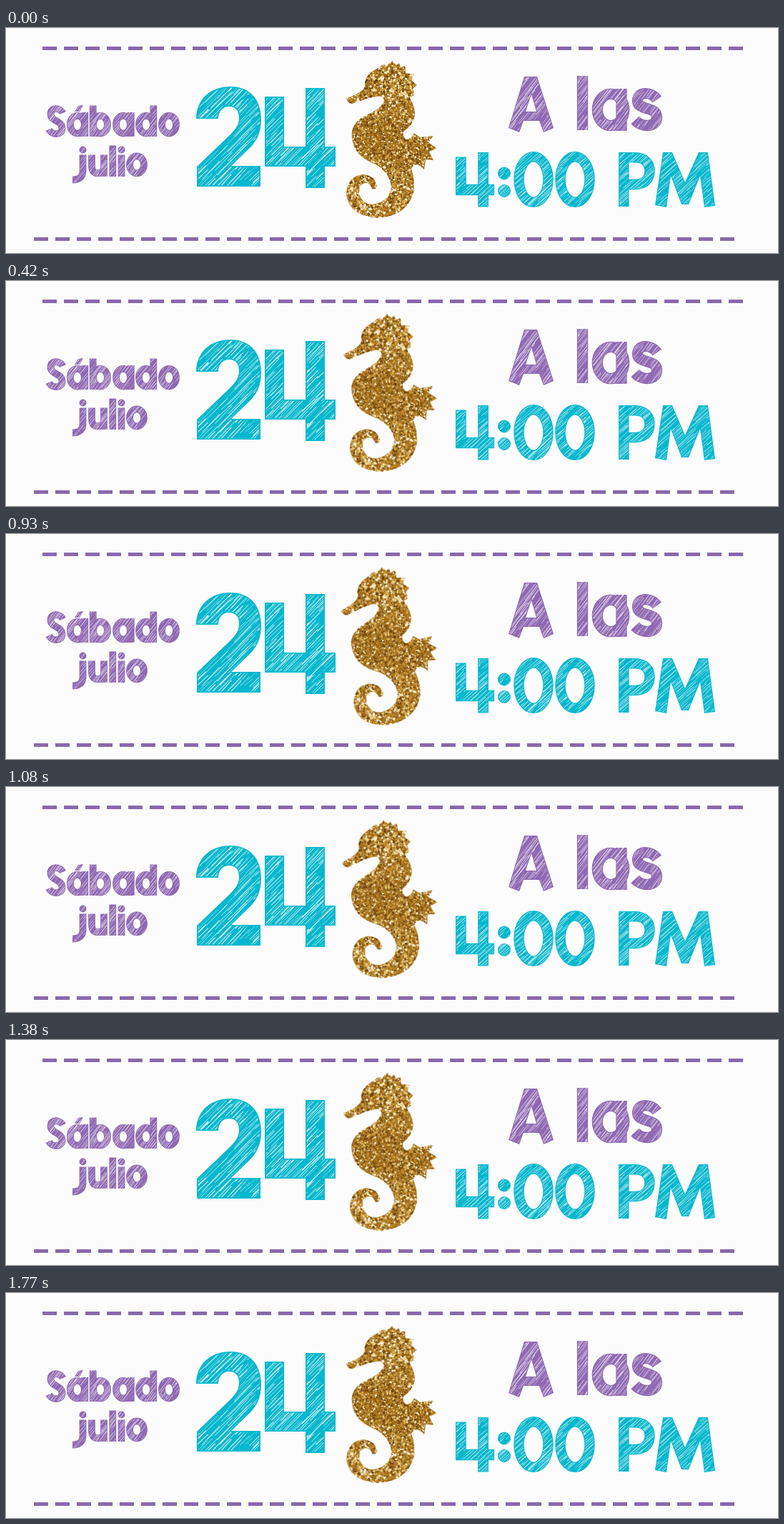
These frames come from a looping animation (1080x315 px, 1.8 s). An HTML page with a canvas:

```html
<!DOCTYPE html>
<html lang="es">
<head>
<meta charset="utf-8">
<title>Sábado 24 julio, a las 4:00 PM</title>
<style>
  html, body { margin: 0; width: 100%; height: 100%; overflow: hidden; background: #fcfcfc; }
  canvas { display: block; }
</style>
</head>
<body>
<canvas id="stage" width="1080" height="315" role="img" aria-label="Sábado 24 julio, a las 4:00 PM"></canvas>
<script>
const W = 1080, H = 315, LOOP = 1800, STEP = 30;
const PAPER = '#fcfcfc', PURPLE = '#8f69b2', DASH = '#8869ac', CYAN = '#06b7cd';

let seed = 24;
const random = () => (seed = (seed * 1664525 + 1013904223) % 4294967296) / 4294967296;
const between = (a, b) => a + (b - a) * random();

function layer() {
  const canvas = document.createElement('canvas');
  canvas.width = W;
  canvas.height = H;
  return canvas.getContext('2d');
}

const ring = (x, y, rx, ry) =>
  `M${x - rx} ${y}a${rx} ${ry} 0 1 1 ${2 * rx} 0a${rx} ${ry} 0 1 1 ${-2 * rx} 0Z`;
const bowl = x => ring(x, 135.2, 10, 12.4);
const four = (x, y, s) => {
  const corners = [[0, 12], [27, 12], [27, 82], [57, 82], [57, 0], [84, 0], [84, 82],
    [99, 82], [99, 110], [84, 110], [84, 140], [57, 140], [57, 110], [0, 110]];
  return 'M' + corners.map(([u, v]) => `${x + u * s} ${y + v * s}`).join('L') + 'Z';
};

// Each word: filled shapes, strokes of one weight, and how its pencil hatching runs.
const words = [
  { color: PURPLE, weight: 9.8, inset: .8, gap: 2, line: .42, angle: -52,
    fill: 'M96 117L101 109L108 108L103 117Z' + ring(107.5, 170.5, 5, 5) + ring(161.5, 170.5, 5, 5),
    stroke: 'M79.5 119C76 111.5 62.5 110.5 62.5 120.5C62.5 131 78.5 129 78.5 140.5C78.5 150.5 64 150.5 60 142' +
      bowl(99.8) + 'M110.3 118V152' +
      'M121.7 108.5V152' + bowl(132) +
      bowl(164) + 'M174.8 118V152' +
      bowl(196) + 'M206.3 108.5V152' + bowl(228) +
      'M107.5 177.5V201Q107 212.5 93 212.5' +
      'M120 177.5V193Q120 203.2 128 203.2Q137 203.2 137 193M137 177.5V208' +
      'M149.3 164.5V208M161.5 177.5V208' + ring(183, 191.3, 10, 12) },
  { color: CYAN, weight: 0, inset: 1.6, gap: 3.2, line: .7, angle: -45,
    fill: 'M266 127C266 99 287 82 314 82C342 82 357 101 357 128C357 146 351 158 341 168L315 193' +
      'H356V222H267V194L313 150C322 141 326 135 326 126C326 115 321 110 312 110' +
      'C303 110 297 117 297 127Z' + four(362, 84, 1) },
  { color: PURPLE, weight: 15.3, inset: 1, gap: 2.3, line: .5, angle: -52,
    fill: 'M725 68H743L766 140L752 146L746 130H724L718 146L703 140ZM735 93L727 117H742Z',
    stroke: 'M806.5 67V143' + ring(846, 114.5, 18.7, 22.2) + 'M861 85V144' +
      'M911 100C903 89 883.5 88 883.5 102C883.5 116 910.5 109 910.5 125C910.5 139 890 140 880 129' },
  { color: CYAN, weight: 14.4, inset: 1, gap: 2.2, line: .52, angle: -42,
    fill: four(629, 174, .547) + ring(697, 203.5, 9, 9) + ring(697, 228, 9, 9) +
      'M919 174H932L950 216L969 174H982L992 249L977 251L971 207L955 247H945L930 207L924 251L908 248Z',
    stroke: ring(738, 212, 20.5, 31.8) + ring(796, 212, 20.5, 31.8) +
      'M864.3 250V181.3H880C894 181.3 900.5 190 900.5 200C900.5 211 894 219 880 219H866' }
];

function drawShapes(g, word, inset) {
  const fill = new Path2D(word.fill);
  g.fillStyle = g.strokeStyle = word.color;
  g.fill(fill, 'evenodd');
  if (inset) {
    g.globalCompositeOperation = 'destination-out';
    g.lineWidth = inset * 2;
    g.stroke(fill);
    g.globalCompositeOperation = 'source-over';
  }
  if (word.stroke) {
    g.lineWidth = word.weight - inset * 2;
    g.stroke(new Path2D(word.stroke));
  }
}

function drawHatching(g, { gap, line, angle }) {
  g.translate(W / 2, H / 2);
  g.rotate(angle * Math.PI / 180);
  g.strokeStyle = PAPER;
  for (let y = -580; y < 580; y += gap) {
    for (let x = -580; x < 580; x += between(12, 65)) {
      const offset = y + between(-gap, gap) * .6;
      g.lineWidth = line * between(.5, 1.5);
      g.beginPath();
      g.moveTo(x, offset);
      g.lineTo(x + between(15, 60), offset + between(-1.5, 1.5));
      g.stroke();
    }
  }
}

function makeBackdrop() {
  const g = layer();
  g.fillStyle = PAPER;
  g.fillRect(0, 0, W, H);
  g.fillStyle = DASH;
  for (let i = 0; i < 33; i++) {
    g.fillRect(51 + i * 30, 26, 20, 5);
    g.fillRect(39 + i * 30, 293, 20, 5);
  }
  for (const word of words) {
    drawShapes(g, word, 0);
    const lines = layer(), inner = layer();
    drawHatching(lines, word);
    drawShapes(inner, word, word.inset);
    inner.globalCompositeOperation = 'source-in';
    inner.drawImage(lines.canvas, 0, 0);
    g.drawImage(inner.canvas, 0, 0);
  }
  return g.canvas;
}

function makeSeahorse() {
  const g = layer();
  const outline = new Path2D(
    'M476 98Q487 95 496 89Q504 84 502 76Q505 62 521 56L527 51L533 52L541 46L546 52L550 49L552 55' +
    'L559 53L559 63L571 65L567 73L575 80L569 85L572 93L565 98Q573 112 572 122Q570 136 556 145' +
    'Q554 152 560 156Q567 156 571 147L579 153L598 151L591 160L603 169L592 173L598 185L587 184' +
    'L585 198L576 191Q570 192 567 197Q573 214 570 230Q561 264 519 266Q478 262 476 232' +
    'Q478 207 499 205Q516 206 519 221Q517 227 512 225Q510 217 502 217Q494 219 494 231' +
    'Q498 247 513 247Q537 243 539 222Q537 203 517 191Q493 181 487 166Q480 146 488 135' +
    'Q494 126 508 120Q526 112 529 101Q527 94 518 96Q505 98 496 102L484 106Q477 105 476 98Z');
  const golds = ['#6b430c', '#8d5b14', '#a8721d', '#bd892c', '#d2a546', '#eccf86', '#fff5d8'];
  g.fillStyle = '#aa761f';
  g.fill(outline);
  g.globalCompositeOperation = 'source-atop';
  for (let i = 0; i < 9500; i++) {
    const x = between(474, 605), y = between(44, 268);
    const fine = y > 105 && y < 200;
    const size = fine ? between(1.4, 3) : between(1.7, 3.9);
    const tone = Math.pow(random(), fine ? 1.4 : 1.05) * golds.length;
    g.fillStyle = golds[Math.floor(tone)];
    g.beginPath();
    g.ellipse(x, y, size / 2, size * between(.35, .65), between(0, 3), 0, 7);
    g.fill();
  }
  return g.canvas;
}

const stage = document.getElementById('stage').getContext('2d');
const backdrop = makeBackdrop(), seahorse = makeSeahorse();
const PIVOT = [537, 157], SWING = -8 * Math.PI / 180;

function draw() {
  const time = Math.floor(performance.now() % LOOP / STEP) * STEP;
  const swing = 1 - Math.abs(time / (LOOP / 2) - 1);
  stage.drawImage(backdrop, 0, 0);
  stage.save();
  stage.translate(...PIVOT);
  stage.rotate(SWING * swing);
  stage.drawImage(seahorse, -PIVOT[0], -PIVOT[1]);
  stage.restore();
  requestAnimationFrame(draw);
}
draw();
</script>
</body>
</html>
```
